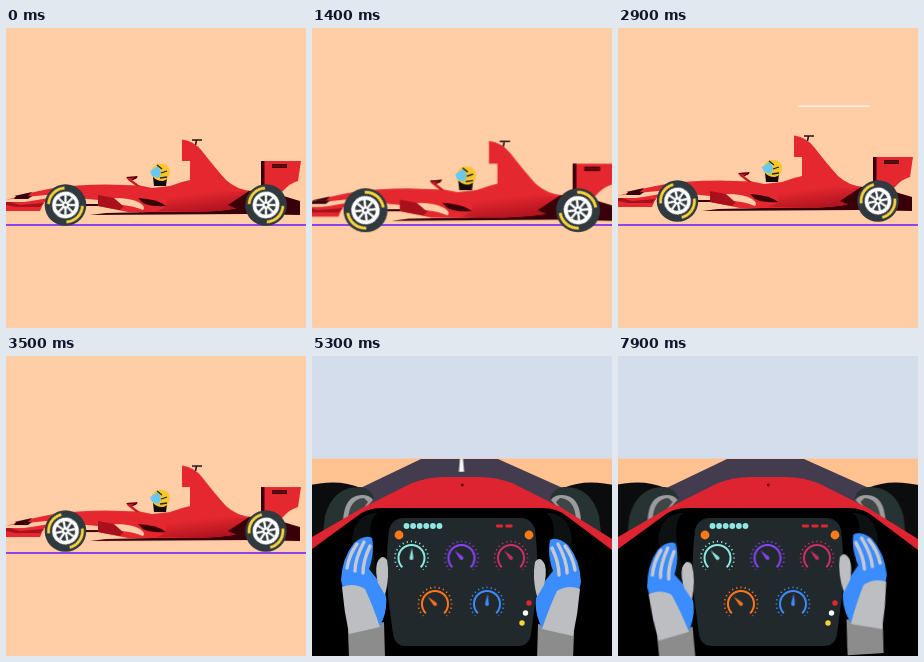
These frames come from a looping animation (300 by 300 pixels, 8000 ms). An HTML page:

```html
<!DOCTYPE html>
<html lang="en">
<head>
<meta charset="utf-8">
<title>Racing car</title>
<style>
  html, body { margin: 0; width: 100%; height: 100%; overflow: hidden; background: #ffcda6; }
  svg { display: block; width: 100vw; height: 100vh; }

  .car, .wind, .spin, .cockpit, .hands, .tyres, .needle, .led, .lamp {
    animation: 8s linear infinite;
  }

  /* Side view */
  .car { transform-origin: 160px 177px; animation-name: bounce; animation-timing-function: ease-in-out; }
  @keyframes bounce {
    0%      { transform: none; }
    3.75%   { transform: translateY(-1px) scale(1.03); }
    10%     { transform: translateY(9.5px) scale(1.05); }
    18.75%  { transform: translateY(5px) scale(1.06); }
    26.25%  { transform: translateY(2px) scale(1.07); }
    36.25%  { transform: translateY(-4px); }
    51.25%  { transform: none; }
    61.25%, 100% { transform: translateY(1px) scale(1.01); }
  }
  /* The wheels turn about a quarter turn every 100 ms, in hard steps */
  .spin { animation-name: spin; }
  @keyframes spin {
    0%      { transform: rotate(45deg); animation-timing-function: steps(8); }
    10%     { transform: rotate(-720deg); animation-timing-function: steps(13); }
    26.25%  { transform: rotate(-1975deg); animation-timing-function: steps(8); }
    36.25%  { transform: rotate(-2760deg); animation-timing-function: steps(12); }
    51.25%  { transform: rotate(-3980deg); animation-timing-function: steps(8); }
    61.25%, 100% { transform: rotate(-4756deg); }
  }
  .wind { animation-name: wind; }
  @keyframes wind {
    0%, 22.4%       { transform: none; }
    27.56%          { transform: translate(372px, 0); }
    27.57%, 32.76%  { transform: none; }
    37.92%          { transform: translate(372px, 0); }
    37.93%, 45.63%  { transform: translate(0, 12.5px); }
    50.79%          { transform: translate(372px, 12.5px); }
    50.8%, 100%     { transform: none; }
  }

  /* Driver view */
  .cockpit { animation-name: cut; animation-timing-function: step-end; }
  @keyframes cut { 0% { visibility: hidden; } 61.25%, 100% { visibility: visible; } }

  .stripe { animation: stripe .4s linear infinite; }
  @keyframes stripe {
    0%  { transform: scale(.6, .1); }
    25% { transform: none; }
    50%, 100% { transform: translateY(21px) scale(1.4); }
  }
  .hands { transform-origin: 149px 225px; animation-name: steer; animation-timing-function: ease-in-out; }
  @keyframes steer {
    0%, 68.75% { transform: none; }
    78.75%, 100% { transform: rotate(-3.5deg); }
  }
  .tyres { animation-name: toe; animation-timing-function: ease-in-out; }
  @keyframes toe {
    0%, 68.75% { transform: none; }
    78.75%, 100% { transform: translateX(-1.5px); }
  }
  .needle { animation-timing-function: ease-in-out; }
  .n1 { animation-name: n1; }
  .n2 { animation-name: n2; }
  .n3 { animation-name: n3; }
  .n4 { animation-name: n4; }
  .n5 { animation-name: n5; }
  @keyframes n1 { 0%, 61% { transform: rotate(-20deg); } 66.25% { transform: rotate(2deg); } 74% { transform: rotate(28deg); } 88%, 100% { transform: rotate(-42deg); } }
  @keyframes n2 { 0%, 66.25% { transform: rotate(-42deg); } 79% { transform: rotate(15deg); } 92%, 100% { transform: rotate(-42deg); } }
  @keyframes n3 { 0%, 66.25% { transform: rotate(-42deg); } 77% { transform: rotate(-5deg); } 92%, 100% { transform: rotate(-42deg); } }
  @keyframes n4 { 0%, 66.25% { transform: rotate(-45deg); } 78% { transform: rotate(0deg); } 89%, 100% { transform: rotate(-45deg); } }
  @keyframes n5 { 0%, 66.25% { transform: rotate(4deg); } 76% { transform: rotate(-25deg); } 90%, 100% { transform: rotate(4deg); } }

  .led { animation-name: led; animation-timing-function: step-end; }
  @keyframes led { 0% { visibility: hidden; } 93.75%, 100% { visibility: inherit; } }
  .lamp { animation-name: lamp; animation-timing-function: step-end; }
  @keyframes lamp { 0% { opacity: 1; } 92.5% { opacity: 0; } 96.25%, 100% { opacity: 1; } }
</style>
</head>
<body>
<svg viewBox="0 0 300 300">
  <defs>
    <g id="wheel">
      <circle r="20.8" fill="#30393d"/>
      <g class="spin" fill="none">
        <circle r="17" stroke="#f9d33c" stroke-width="2.8" pathLength="360" stroke-dasharray="84 96" stroke-dashoffset="42"/>
        <circle r="13.3" fill="#fff"/>
        <circle r="9.8" fill="#30393d"/>
        <path d="M-10 0H10M0-10V10M-7-7L7 7M-7 7L7-7" stroke="#fff" stroke-width="2.2"/>
        <circle r="3.4" fill="#fff"/>
        <circle r="1.4" fill="#30393d"/>
      </g>
    </g>
    <linearGradient id="shade" x1=".2" y1="0" x2=".75" y2="1">
      <stop offset=".2" stop-color="#e5282f"/>
      <stop offset="1" stop-color="#a8101c"/>
    </linearGradient>
    <g id="gauge" fill="none" stroke="currentColor">
      <circle r="16.6" stroke-width="1.7" pathLength="360" stroke-dasharray="4 11" stroke-dashoffset="2" mask="url(#open)"/>
      <path d="M-9.2 9.2A13 13 0 1 1 9.2 9.2" stroke-width="2"/>
    </g>
    <mask id="open" maskUnits="userSpaceOnUse" x="-20" y="-20" width="40" height="40">
      <path d="M-20-20H20V20L0 0L-20 20Z" fill="#fff"/>
    </mask>
    <path id="pointer" d="M-1.9 0L0-10.5L1.9 0A1.9 1.9 0 0 1-1.9 0Z" fill="currentColor"/>
    <g id="tyre">
      <path d="M-6 130Q26 122 49 132L58 140L30 180L-6 184Z" fill="#0a0c0d"/>
      <path d="M49 131Q21 130 13 160L11 177L34 170L62 142Q59 133 49 131Z" fill="#263332"/>
      <path d="M31 166Q32 139 50 139Q58 139 61 144L50 156Z" fill="#9c9c9c"/>
      <path d="M36 164Q37 143 52 142L56 146L48 157Z" fill="#3f4647"/>
    </g>
    <g id="glove">
      <path d="M36 274L72 266L73 302H37Z" fill="#8c8c8c"/>
      <path d="M29 224Q30 202 42 187Q53 178 60 182Q63 196 57 213L65 223L74 240Q76 256 67 272L33 242Z" fill="#3a8cff"/>
      <path d="M30 231Q42 226 53 233Q61 250 68 271L37 278Q32 255 30 231Z" fill="#bcbec1"/>
      <path d="M65 207Q70 197 75 204Q78 220 73 239L66 227Q63 216 65 207Z" fill="#bcbec1"/>
      <path d="M35 212Q37 199 45 188M43 215Q43 203 52 186M51 217Q51 205 58 190" fill="none" stroke="#c6c9ce" stroke-width="3.4" stroke-linecap="round"/>
    </g>
  </defs>

  <rect width="300" height="300" fill="#ffcda6"/>
  <rect y="196" width="300" height="2" fill="#8b45f0"/>
  <rect class="wind" x="-73" y="77.5" width="72" height="1.4" fill="#f5f1ee"/>

  <g class="car">
    <!-- floor and rear -->
    <path d="M84 187L100 185L190 183L236 170L264 164L294 173V187L240 186Z" fill="#3a0009"/>
    <!-- rear wing -->
    <path d="M255 133H295L292 153Q284 155 277 163L270 168H255Z" fill="#e5282f"/>
    <path d="M255 133H258.5V160L255 165Z" fill="#3a0009"/>
    <path d="M266 136H281V140H266Z" fill="#3a0009"/>
    <path d="M266 138H281" stroke="#a8101c" stroke-width=".8"/>
    <!-- body -->
    <path d="M-30 178L0 172Q28 163 48 160Q70 156.5 100 156.5L134 157.5L146 160L164 158L176 154L184 152V133H176V111.5Q188 113 196 123Q210 141 220 152Q231 162 246 163L252 165L238 178Q225 183 190 184L122 184L92 178V172L40 167L10 170L-30 178Z" fill="#e5282f"/>
    <path d="M160 163Q195 160 232 164L246 164L238 178Q225 183 190 184L150 183Q160 180 160 176Z" fill="url(#shade)"/>
    <path d="M222 177L243 163H256L250 180L238 184Z" fill="#3a0009"/>
    <!-- bargeboard and side opening -->
    <path d="M92 167L108 170L118 178L114 182L92 178Z" fill="#a8101c"/>
    <path d="M108 170Q126 170 134 175Q140 179 137 182Q128 178 116 177Z" fill="#ffcda6"/>
    <path d="M132 170Q152 171 160 178Q146 179 137 175Z" fill="#3a0009"/>
    <path d="M80 176H92V178H80Z" fill="#3a0009"/>
    <!-- front wing -->
    <path d="M8 168L26 164L22 168Z" fill="#3a0009"/>
    <path d="M-30 174H18Q32 172 42 170L37 176L34 183H-30Z" fill="#e5282f"/>
    <path d="M-30 174H4L14 177L38 175L34 179H10L0 177H-30Z" fill="#a8101c"/>
    <path d="M10 168H26L22 171H8Z" fill="#3a0009"/>
    <!-- mirror, aerial -->
    <path d="M120 149L132 148L130 151L126 152L134 158H130L122 152Z" fill="#c91b24"/>
    <path d="M121 149.5L131 149L126 152" fill="none" stroke="#3a0009"/>
    <path d="M186 112H196M190.5 112L189.5 117" fill="none" stroke="#241014" stroke-width="1.5"/>
    <!-- driver -->
    <path d="M147 149L161 150L160 158H148Z" fill="#120a0b"/>
    <path d="M146 147Q144 139 152 136Q162 134 164 143Q164 151 157 153Q149 153 146 147Z" fill="#fbc62c"/>
    <path d="M144 143L152 138L155 144L153 150L146 148Z" fill="#67c9f2"/>
    <path d="M151 137L156 141M155 145L161 143M154 150L161 149" stroke="#1c2326" stroke-width="1.3"/>
    <use href="#wheel" x="59.5" y="177"/>
    <use href="#wheel" x="260" y="177"/>
  </g>

  <g class="cockpit">
    <rect width="300" height="300" fill="#ffc290"/>
    <rect width="300" height="102.5" fill="#d3ddec"/>
    <path d="M109 103H186L262 137V165H38V137Z" fill="#433b4e"/>
    <g transform="translate(149.5 102.5)">
      <path class="stripe" d="M-1.5 0H1.5L2.6 13H-2.6Z" fill="#f4f4f6"/>
    </g>
    <g class="tyres">
      <use href="#tyre"/>
      <use href="#tyre" transform="matrix(-1 0 0 1 300 0)"/>
    </g>
    <path d="M0 181L50 152L100 127Q116 121 132 121H168Q184 121 200 127L250 152L300 183V300H0Z" fill="#dd2430"/>
    <circle cx="150.3" cy="129" r="1.4" fill="#5c0d14"/>
    <path d="M0 193L44 161Q54 152 70 152H230Q246 152 256 161L300 194V300H0Z"/>
    <path d="M62 157H238Q258 160 260 184L250 230L232 292H68L50 230L40 184Q42 160 62 157Z" fill="#0d1112"/>
    <path d="M66 157H234Q248 165 237 205L228 292H72L63 205Q52 165 66 157Z"/>
    <path d="M92 162H208Q220 162 223 174Q227 205 224 240L219 278Q217 290 206 290H94Q83 290 81 278L76 240Q73 205 77 174Q80 162 92 162Z" fill="#22292c"/>

    <path d="M94.5 170H128" fill="none" stroke="#8ee8e2" stroke-width="5.8" stroke-linecap="round" stroke-dasharray="0 6.6"/>
    <g fill="#e0262f">
      <rect x="184" y="168.5" width="7" height="3" rx="1"/>
      <rect x="193.5" y="168.5" width="7" height="3" rx="1"/>
      <rect class="led" x="203" y="168.5" width="7" height="3" rx="1"/>
      <circle class="lamp" cx="217" cy="247" r="2.7"/>
    </g>
    <circle cx="213.5" cy="257" r="2.7" fill="#fff"/>
    <circle cx="210" cy="267" r="2.7" fill="#f9d33c"/>
    <g fill="#ff7a1a">
      <circle cx="87" cy="179" r="4.4"/>
      <circle cx="217" cy="179" r="4.4"/>
    </g>

    <g transform="translate(99.5 202)" color="#8ee8e2">
      <use href="#gauge"/><g class="needle n1"><use href="#pointer"/></g>
    </g>
    <g transform="translate(149.5 202)" color="#8a45f5">
      <use href="#gauge"/><g class="needle n2"><use href="#pointer"/></g>
    </g>
    <g transform="translate(199 202)" color="#cc2f62">
      <use href="#gauge"/><g class="needle n3"><use href="#pointer"/></g>
    </g>
    <g transform="translate(123 248)" color="#ff741c">
      <use href="#gauge"/><g class="needle n4"><use href="#pointer"/></g>
    </g>
    <g transform="translate(175 248)" color="#3a8cff">
      <use href="#gauge"/><g class="needle n5"><use href="#pointer"/></g>
    </g>

    <g class="hands">
      <use href="#glove"/>
      <use href="#glove" transform="matrix(-1 0 0 1 298 2)"/>
    </g>
  </g>
</svg>
</body>
</html>
```
